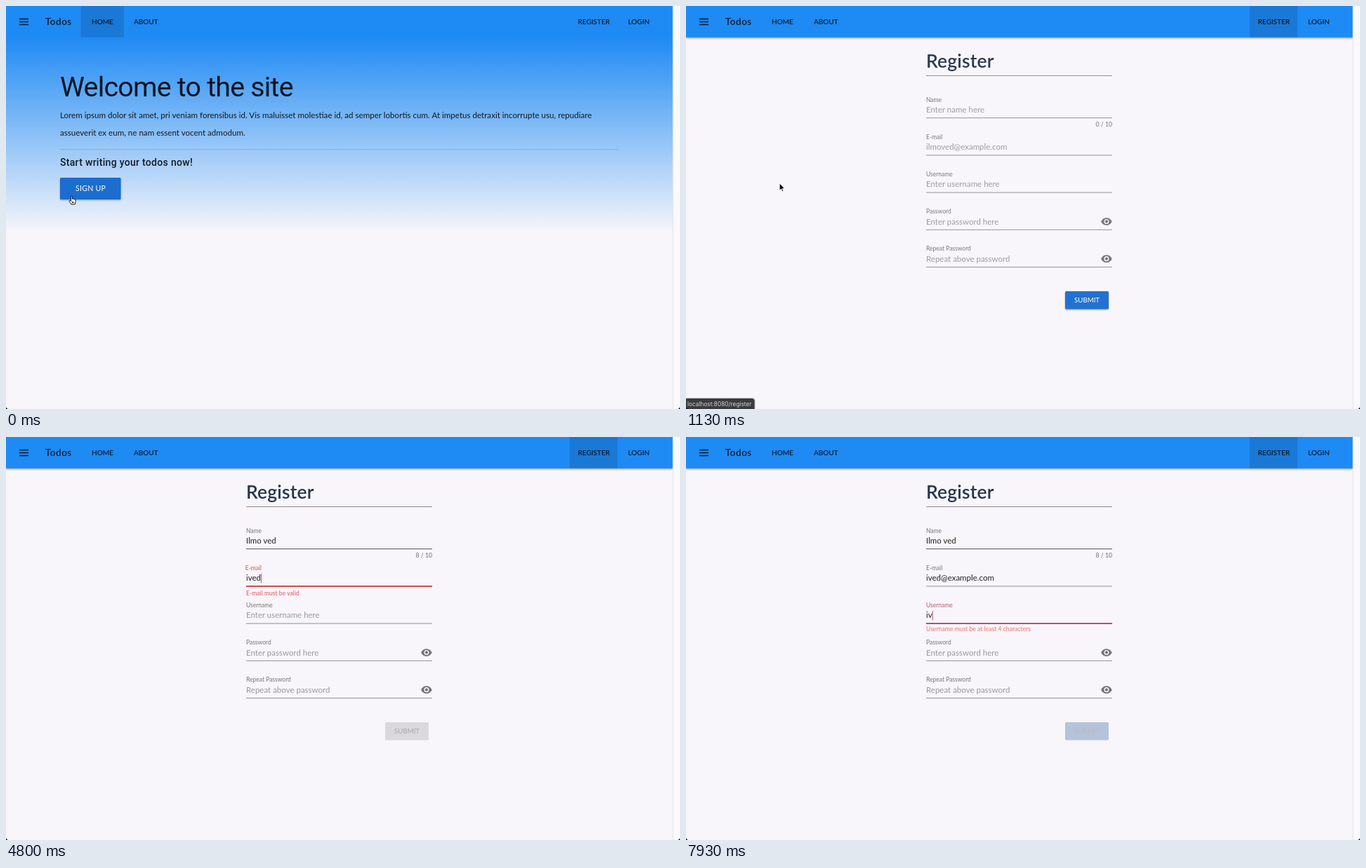
An HTML page that plays this animation: 960 px wide and 575 px high, repeating every 8 s.

```html
<!DOCTYPE html>
<html lang="en">
<head>
<meta charset="utf-8">
<title>Todos</title>
<style>
  html, body { margin: 0; width: 100%; height: 100%; overflow: hidden; background: #f8f6fa; }
  svg { display: block; width: 100vw; height: 100vh; }
  text { font-family: Lato, sans-serif; fill: rgba(0, 0, 0, .87); white-space: pre; }
  .brand { font-size: 13.5px; font-weight: 500; letter-spacing: .5px; }
  .nav { font-size: 10px; font-weight: 500; }
  .hero { font: 400 39.4px Roboto, sans-serif; letter-spacing: -.02em; }
  .lead { font: 500 14.06px Roboto, sans-serif; letter-spacing: .02em; }
  .body { font-size: 11.6px; }
  .heading { font-size: 26.5px; font-weight: 600; letter-spacing: .15px; fill: #26364a; }
  .label { font-size: 8.5px; }
  .input { font-size: 11.5px; }
  .hint { font-size: 11.5px; fill: rgba(0, 0, 0, .38); }
  .error { font-size: 8.65px; fill: #e5505a; }
  .counter { font-size: 8.7px; fill: rgba(0, 0, 0, .54); text-anchor: end; }
  .button { fill: #1b6dd0; filter: drop-shadow(0 1px 1px rgba(0, 0, 0, .35)); }
  .status { font: 8.3px Inter, sans-serif; fill: #d6d6d8; }
  .rule { stroke: #000; stroke-width: .8; }
</style>
</head>
<body>
<svg viewBox="0 0 960 575">
  <defs>
    <linearGradient id="sky" x2="0" y2="1">
      <stop stop-color="#1e8af4"/><stop offset="1" stop-color="#f8f6fa"/>
    </linearGradient>
  </defs>
  <rect width="960" height="575" fill="#f8f6fa"/>

  <g id="home">
    <rect y="44" width="950" height="280" fill="url(#sky)"/>
    <text class="hero" x="77" y="129.3">Welcome to the site</text>
    <text class="body" x="77" y="160">Lorem ipsum dolor sit amet, pri veniam forensibus id. Vis maluisset molestiae id, ad semper lobortis cum. At impetus detraxit incorrupte usu, repudiare</text>
    <text class="body" x="77" y="185">assueverit ex eum, ne nam essent vocent admodum.</text>
    <path class="rule" d="M77 204.4H873" opacity=".16"/>
    <text class="lead" x="77" y="227.5">Start writing your todos now!</text>
    <rect class="button" x="77" y="245" width="86.5" height="31" rx="1.5"/>
    <text x="99" y="264" style="font-size:10.6px;letter-spacing:.25px;fill:#fff">SIGN UP</text>
  </g>

  <g id="register">
    <text class="heading" x="342" y="88.3">Register</text>
    <path class="rule" d="M342 99.5H607" opacity=".55"/>
    <g id="fields"></g>
    <rect id="submitBox" class="button" x="540" y="407" width="62" height="25.5" rx="1.5"/>
    <text id="submitText" x="553" y="423.4" style="font-size:9.7px">SUBMIT</text>
  </g>

  <rect id="bar" width="950" height="44.7" fill="#1e8af4"/>
  <rect id="active" y="0" height="44.7" opacity=".12"/>
  <path d="M19 18.5H32M19 22.5H32M19 26.5H32" stroke="#0c1a2b" stroke-width="1.5"/>
  <text class="brand" x="56" y="27">Todos</text>
  <text class="nav" x="122" y="26">HOME</text>
  <text class="nav" x="182" y="26">ABOUT</text>
  <text class="nav" x="814.5" y="26">REGISTER</text>
  <text class="nav" x="886" y="26">LOGIN</text>

  <rect x="950" width="10" height="575" fill="#faf9fb"/>
  <path d="M950 0V575" stroke="#e4e2e6"/>
  <g id="status">
    <path d="M0 560H94Q97.5 560 97.5 563.5V575H0Z" fill="#393b3f" style="filter:drop-shadow(0 0 1px #0008)"/>
    <text class="status" x="2" y="571">localhost:8080/register</text>
  </g>
  <path d="M0 571Q0 575 4 575H0ZM960 571Q960 575 956 575H960Z"/>

  <g id="cursor" stroke-linejoin="round">
    <path id="hand" fill="#fff" stroke="#000" stroke-width=".9" d="M-.9 .9Q-.9 0 0 0T.9 .9V4.3Q2.5 3.6 2.8 4.6Q4 4.1 4.3 5.1Q5.6 4.9 5.6 6.2V8.5L4.6 12H-.6L-3.2 8.3Q-4.2 6.7-3 6.4Q-2 6.3-.9 7.7ZM1 8V10.5M2.6 8V10.5"/>
    <path id="arrow" stroke="#fff" stroke-width=".8" d="M0 0V10.2L2.4 8L4 11.7L5.6 11L4.1 7.4H7.2Z"/>
    <path id="beam" fill="none" stroke="#111" d="M-2.5-5.5Q0-5.5 0-4Q0-5.5 2.5-5.5M0-4V4M-2.5 5.5Q0 5.5 0 4Q0 5.5 2.5 5.5M-1.2 1.5H1.2"/>
  </g>
</svg>
<script>
const LOOP = 8000, LEFT = 342, RIGHT = 607;
const CLICK = 595, SWAP = 895, HOVER_NAME = 1950, TYPING = 2850;
const BLUE = '#1468bd', RED = '#d2393f', NEVER = Infinity;
const $ = id => document.getElementById(id);

const fields = [
  { label: 'Name', hint: 'Enter name here', focus: 2200, blur: 4120, text: 'Ilmo ved',
    keyTime: i => TYPING + 150 * i, limit: 10 },
  { label: 'E-mail', hint: 'ilmoved@example.com', focus: 4120, blur: 7100, text: 'ived@example.com',
    keyTime: i => i < 4 ? 4270 + 145 * i : 5150 + 135 * (i - 4),
    error: 'E-mail must be valid', bad: 4270, good: 6365, spellcheck: true },
  { label: 'Username', hint: 'Enter username here', focus: 7100, text: 'iv',
    keyTime: i => 7780 + 120 * i, error: 'Username must be at least 4 characters', bad: 7780 },
  { label: 'Password', hint: 'Enter password here', secret: true },
  { label: 'Repeat Password', hint: 'Repeat above password', secret: true },
];

const pointer = [[0, 93.5, 271], [450, 109, 265], [800, 109, 265], [1130, 133, 253],
  [1500, 205, 222], [2100, 369, 155]];

const EYE = 'M12 4.5C7 4.5 2.73 7.61 1 12c1.73 4.39 6 7.5 11 7.5s9.27-3.11 11-7.5c-1.73-4.39-6-7.5-11-7.5z' +
  'M12 17a5 5 0 1 1 0-10a5 5 0 0 1 0 10zM12 9a3 3 0 1 0 0 6a3 3 0 0 0 0-6z';

const clamp = v => Math.min(1, Math.max(0, v));
const ease = (t, start, length = 300) => 1 - (1 - clamp((t - start) / length)) ** 2.3;
const mix = (from, to, amount) => `color-mix(in srgb, ${to} ${(amount * 100).toFixed(1)}%, ${from})`;
const show = (el, visible) => el.setAttribute('opacity', +visible);

fields.forEach((f, i) => {
  const y = f.y = 159.7 + 53.2 * i;
  $('fields').insertAdjacentHTML('beforeend', `<g>
    <text class="label" x="${LEFT}" y="${y - 23.2}">${f.label}</text>
    <text class="hint" x="${LEFT}" y="${y - 7.7}">${f.hint}</text>
    <text class="input" x="${LEFT}" y="${y - 7.7}"></text>
    <path class="rule" d="M${LEFT} ${y}H${RIGHT}"/>
    <path class="line" stroke-width="1.6"/>
    <path class="squiggle" stroke="#e03a3a" stroke-width="1.3" stroke-dasharray="1.4 1.4"/>
    <path class="caret" stroke-width=".9"/>
    <svg x="${LEFT}" y="${y + 4}" width="265" height="14"><text class="error">${f.error || ''}</text></svg>
    <text class="counter" x="${RIGHT}" y="${y + 12.6}"></text>
    ${f.secret ? `<path d="${EYE}" fill="#757478" fill-rule="evenodd"
      transform="translate(590.5 ${y - 20.3}) scale(.703)"/>` : ''}</g>`);
  const group = $('fields').lastElementChild;
  for (const name of ['label', 'hint', 'input', 'rule', 'line', 'squiggle', 'caret', 'error', 'counter'])
    f[name + 'El'] = group.querySelector('.' + name);
});

// Draws one field and returns how invalid it is, from 0 to 1.
function drawField(f, t) {
  const { y, focus = NEVER, blur = NEVER, bad = NEVER, good = NEVER, text = '' } = f;
  const focused = t >= focus && t < blur;
  const focusAmount = ease(t, focus) - ease(t, blur);
  const invalid = ease(t, bad) - ease(t, good);

  const typed = [...text].filter((_, i) => t >= f.keyTime(i)).join('');
  f.inputEl.textContent = typed;
  show(f.hintEl, !typed);
  if (f.limit) f.counterEl.textContent = `${typed.length} / ${f.limit}`;

  const accent = mix(BLUE, RED, invalid);
  f.labelEl.style.fill = mix('#777579', mix('#2b7cc4', '#e0505a', invalid), focusAmount);
  const shake = (t - bad) / 600;
  f.labelEl.setAttribute('x', LEFT + (shake > .6 && shake < 1 ? 1.4 * Math.cos((shake - .6) * 10 * Math.PI) : 0));

  show(f.ruleEl, 0);
  f.ruleEl.setAttribute('opacity', f.limit && t > HOVER_NAME ? .85 : .52);
  const half = (RIGHT - LEFT) / 2 * ease(t, focus), middle = (LEFT + RIGHT) / 2;
  f.lineEl.setAttribute('d', `M${middle - half} ${y}H${middle + half}`);
  f.lineEl.style.stroke = accent;
  show(f.lineEl, focused);

  const lastEvent = typed ? f.keyTime(typed.length - 1) : focus;
  const caretX = LEFT + .6 + (typed ? f.inputEl.getComputedTextLength() : 0);
  f.caretEl.setAttribute('d', `M${caretX} ${y - 18}V${y - 4.5}`);
  f.caretEl.style.stroke = accent;
  show(f.caretEl, focused && (t - lastEvent) % 1000 < 500);

  const dot = typed.indexOf('.');
  const misspelt = f.spellcheck && focused && dot > 0;
  if (misspelt) {
    const width = f.inputEl.getSubStringLength(0, dot);
    f.squiggleEl.setAttribute('d', `M${LEFT} ${y - 5}h${width}`);
  }
  show(f.squiggleEl, misspelt || false);

  f.errorEl.setAttribute('y', 9 - 10 * (1 - invalid));
  f.errorEl.setAttribute('opacity', invalid);
  return invalid;
}

function drawPointer(t) {
  const next = pointer.findIndex(p => p[0] > t);
  let [, x, y] = pointer.at(-1);
  if (next > 0) {
    const [t0, x0, y0] = pointer[next - 1], [t1, x1, y1] = pointer[next];
    const k = (t - t0) / (t1 - t0);
    x = x0 + (x1 - x0) * k;
    y = y0 + (y1 - y0) * k;
  }
  $('cursor').setAttribute('transform', `translate(${x} ${y})`);
  show($('cursor'), t < TYPING);
  show($('hand'), t < SWAP);
  show($('arrow'), t >= SWAP && t < HOVER_NAME);
  show($('beam'), t >= HOVER_NAME);
}

function draw(t) {
  const clicked = t >= CLICK;
  $('home').setAttribute('opacity', 1 - ease(t, CLICK));
  $('register').setAttribute('opacity', ease(t, SWAP));
  $('active').setAttribute('x', clicked ? 803 : 106.5);
  $('active').setAttribute('width', clicked ? 68 : 61.5);
  $('bar').style.filter = clicked ? 'drop-shadow(0 1px 1.5px rgba(0,0,0,.45))' : 'none';
  $('status').setAttribute('opacity', ease(t, 250, 150) - ease(t, 1350, 200));

  const invalid = Math.max(...fields.map(f => drawField(f, t)));
  $('submitBox').style.fill = mix('#1b6dd0', '#dad8dc', invalid);
  $('submitBox').style.filter = invalid > .5 ? 'none' : '';
  $('submitText').style.fill = mix('#ffffff', '#a9a7ab', invalid);
  drawPointer(t);
}

const start = performance.now();
(function tick() {
  draw((performance.now() - start) % LOOP);
  requestAnimationFrame(tick);
})();
</script>
</body>
</html>
```
